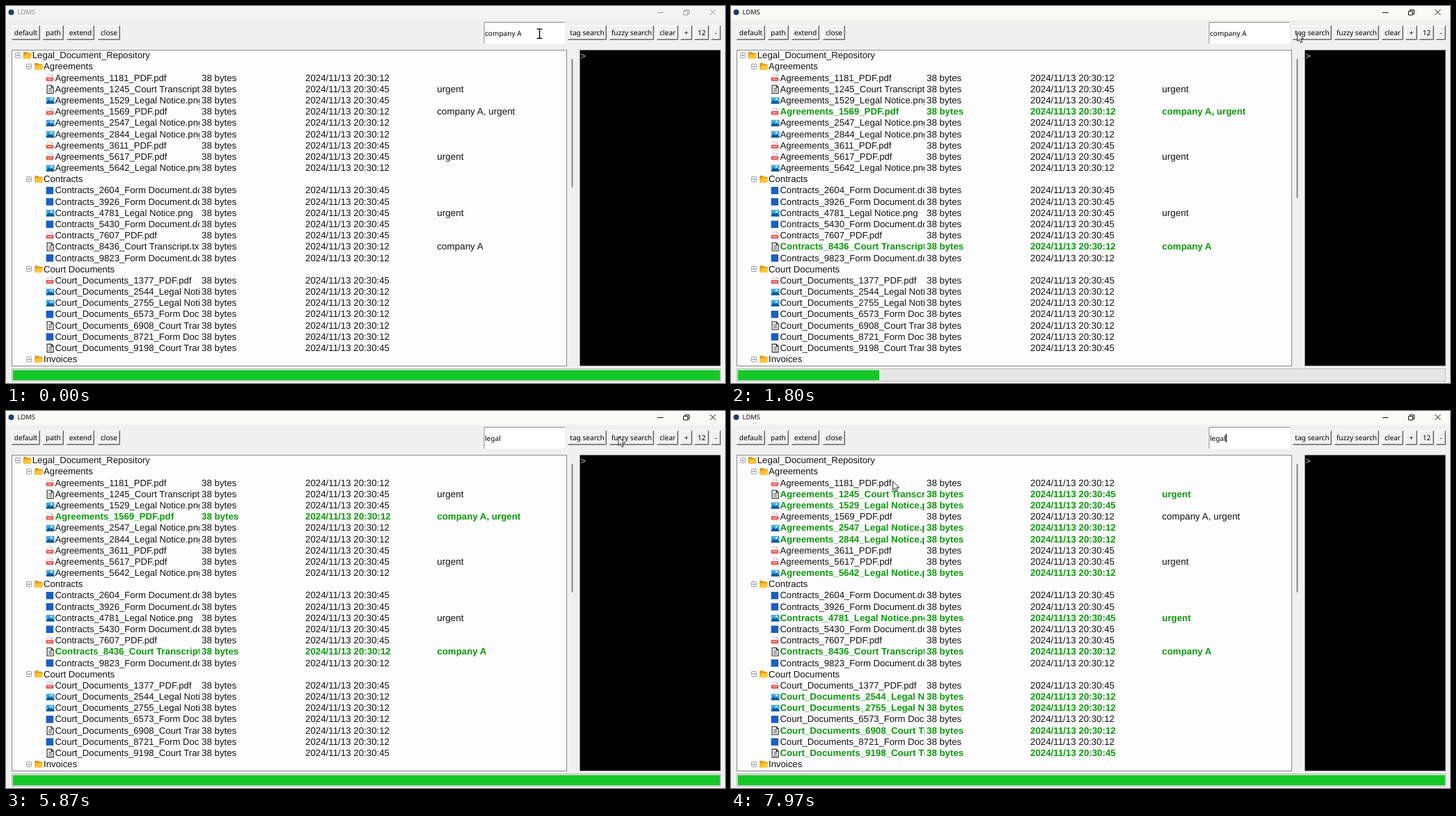
Recreate the animation shown at these times as an HTML page. Size 1033x542 px, loop 8 s.

```html
<!DOCTYPE html>
<html lang="en">
<head>
<meta charset="utf-8">
<title>LDMS</title>
<style>
html, body { margin: 0; width: 100%; height: 100%; overflow: hidden; background: #f0f0f0; }
svg { display: block; width: 1033px; height: 542px; text-rendering: geometricPrecision; }
text { white-space: pre; }
.ui { font: 10.1px "Noto Sans", "Open Sans", sans-serif; }
.tree text { font: 13.3px "Liberation Sans", Arial, sans-serif; fill: #111; }
.tree .name { font-size: 13.12px; }
.tree .tags { font-size: 13.45px; }
.tree .hit text { font-weight: bold; font-size: 13.3px; fill: #0c9a0c; }
</style>
</head>
<body>
<svg id="stage" viewBox="0 0 1033 542"></svg>
<script>
const LOOP = 8000, TOTAL = 65, PITCH = 16.18, TOP = 70.9;
const stage = document.getElementById('stage');

function add(parent, tag, attrs = {}, text) {
  const el = document.createElementNS('http://www.w3.org/2000/svg', tag);
  for (const k in attrs) el.setAttribute(k, attrs[k]);
  if (text !== undefined) el.textContent = text;
  parent.appendChild(el);
  return el;
}
const rect = (p, x, y, width, height, fill, more) => add(p, 'rect', { x, y, width, height, fill, ...more });
const path = (p, d, stroke, fill = 'none', w = 1) => add(p, 'path', { d, stroke, fill, 'stroke-width': w });
const show = (el, on) => el.setAttribute('visibility', on ? 'visible' : 'hidden');

// Window frame
rect(stage, 0, 0, 1033, 542, '#f0f0f0');
const titleBar = rect(stage, 0, 0, 1033, 20, '#f9f9f5');
add(stage, 'circle', { cx: 7.5, cy: 9, r: 4, fill: '#1d3f66' });
const title = add(stage, 'text', { x: 16.5, y: 12.3, class: 'ui', style: 'font-size:9.4px' }, 'LDMS');
const controls = path(stage,
  'M936 9.5H944.5M973.5 7.5H979.5V13H973.5ZM975.5 7V5.5H981.5V11.5H980M1011.5 5L1019.5 13M1019.5 5L1011.5 13');

// Toolbar
function button(x1, x2, label) {
  rect(stage, x1, 28, x2 - x1, 21, '#f0f0f0');
  path(stage, `M${x1 + .5} 48V28.5H${x2 - 1}`, '#fff');
  path(stage, `M${x1 + 1} 47.5H${x2 - 1.5}V29`, '#a6a6a6');
  path(stage, `M${x1} 48.5H${x2 - .5}V28`, '#6c6c6c');
  add(stage, 'text', { x: (x1 + x2) / 2, y: 41.6, class: 'ui', 'text-anchor': 'middle' }, label);
}
[[8, 49, 'default'], [53, 83, 'path'], [87, 127, 'extend'], [132, 164, 'close'],
 [807, 863, 'tag search'], [867, 931, 'fuzzy search'], [935, 966, 'clear'],
 [969, 986, '+'], [989, 1010, '12'], [1013, 1027, '-']].forEach(b => button(...b));

// Search entry
rect(stage, 687, 23, 116, 31, '#fff');
path(stage, 'M687 54V23.5H803', '#8c8c8c');
const selBox = rect(stage, 688, 32, 0, 13, '#0078d7');
const entry = add(stage, 'text', { x: 688, y: 42.8, class: 'ui' });
const plain = add(entry, 'tspan'), picked = add(entry, 'tspan', { fill: '#fff' });
const caret = rect(stage, 0, 33, 1.3, 12, '#000');

// Panels
rect(stage, 8.5, 63.5, 797, 454, '#fdfdfd', { stroke: '#858a92' });
rect(stage, 824.3, 63.2, 202.4, 454.1, '#000', { stroke: '#a0a0a0', 'stroke-width': .6 });
add(stage, 'text', { x: 825.5, y: 75.6, fill: '#c8c8c8', style: 'font:12.5px "Liberation Sans",sans-serif' }, '>');
const thumb = rect(stage, 812.5, 76, 2, 185, '#858585', { rx: 1 });
const arrows = path(stage, 'M810 73L813.7 67L817.4 73ZM810 509L813.7 515L817.4 509Z', 'none', '#a3a3a3');
rect(stage, 8.5, 521.5, 1018, 18, '#e6e6e6', { stroke: '#bcbcbc' });
const bar = rect(stage, 9.8, 523.5, 1016, 14.6, '#14c828');

// Tree
const kinds = {
  p: 'PDF.pdf', t: 'Court Transcript.txt', i: 'Legal Notice.png', w: 'Form Document.docx'
};
const icons = {
  folder(g, x, y) {
    path(g, `M${x} ${y - 5}h4.5l1.5 1.5h5v8h-11z`, 'none', '#dc9a16');
    path(g, `M${x} ${y + 5}l2-6.5h10l-1.6 6.5z`, 'none', '#ffc636');
  },
  p(g, x, y) {
    path(g, `M${x + 2} ${y - 5.5}h5.5l3 3v8.5h-8.5z`, '#d3d5d8', '#eceef0', .7);
    path(g, `M${x + 7.5} ${y - 5.5}v3h3z`, 'none', '#c2c5c9');
    rect(g, x, y - .6, 10.5, 5, '#e5504c', { rx: .8 });
    rect(g, x + 2, y + 1.2, 6.5, 1.3, '#f8cac8');
  },
  t(g, x, y) {
    path(g, `M${x + 1.5} ${y - 5.5}h6l3 3v8.5h-9zM${x + 7.5} ${y - 5.5}v3h3`, '#222', '#fff', 1.1);
    path(g, `M${x + 3.5} ${y - 1}h5M${x + 3.5} ${y + 1.2}h5M${x + 3.5} ${y + 3.4}h5`, '#333', 'none', .9);
  },
  i(g, x, y) {
    rect(g, x, y - 4.3, 12, 9.3, '#43a9e6', { rx: 1 });
    path(g, `M${x} ${y + 4}l3.8-4.5l2.4 2.4l2-1.8l3.8 3.9v1h-12z`, 'none', '#0f5790');
    add(g, 'circle', { cx: x + 7.8, cy: y - 1.8, r: 1.3, fill: '#fff' });
  },
  w(g, x, y) { rect(g, x, y - 5, 10.5, 10.5, '#1b5fc1'); }
};
const folders = [
  ['Agreements', '1181p12 1245t45u 1529i45 1569p12cu 2547i12 2844i12 3611p45 5617p45u 5642i12'],
  ['Contracts', '2604w45 3926w45 4781i45u 5430w45 7607p45 8436t12c 9823w12'],
  ['Court Documents', '1377p45 2544i12 2755i12 6573w12 6908t12 8721w12 9198t45'],
  ['Invoices', '']
];
const clip = add(add(stage, 'defs'), 'clipPath', { id: 'nameCol' });
rect(clip, 9, 64, 269, 453, '#000');
const tree = add(stage, 'g', { class: 'tree' });
const rows = [];

function addRow(level, icon, name, [size, date, tags] = [], tests = {}) {
  const g = add(tree, 'g'), y = TOP + rows.length * PITCH, x = 25 + 16.3 * level;
  const put = (tx, s, more) => add(g, 'text', { x: tx, y: y + 4.4, ...more }, s);
  icons[icon](g, x, y);
  put(x + 12.8, name, { class: 'name', 'clip-path': 'url(#nameCol)' });
  if (size) {
    put(281, size);
    put(430, date);
    put(619.3, tags, { class: 'tags' });
  }
  let toggle = null;
  if (icon === 'folder') {
    toggle = add(g, 'g');
    const tx = Math.round(x - 12), ty = Math.round(y - 3) - .5;
    rect(toggle, tx + .5, ty, 7, 7, '#fafafa', { stroke: '#999', rx: .8 });
    path(toggle, `M${tx + 2} ${ty + 3.5}h4`, '#44609c');
  }
  rows.push({ g, toggle, tests });
}
addRow(0, 'folder', 'Legal_Document_Repository');
for (const [name, files] of folders) {
  addRow(1, 'folder', name);
  for (const f of files.split(' ').filter(Boolean)) {
    const [, num, kind, sec, tags] = f.match(/(\d+)(\w)(\d\d)(\w*)/);
    const labels = [...tags].map(c => c === 'c' ? 'company A' : 'urgent').join(', ');
    addRow(2, kind, `${name.replace(' ', '_')}_${num}_${kinds[kind]}`,
      ['38 bytes', `2024/11/13 20:30:${sec}`, labels],
      { tag: tags.includes('c'), fuzzy: kind === 't' || kind === 'i' });
  }
}

// Pointers
const arrow = path(stage, 'M0 0V12.6L2.9 9.9L5 14.8L7.1 13.9L5 9.2H9Z', '#111', '#fff', .9);
const beam = path(stage, 'M-4 -6.5H-1L0 -5.7L1 -6.5H4M0 -5.7V6M-4 7H-1L0 6L1 7H4', '#000', 'none', 1.4);

// Timeline
const moves = [
  [0, 766.6, 39.6], [350, 766.6, 39.6], [800, 813.6, 38], [2500, 813.6, 38], [2950, 744, 39], [3050, 744, 39],
  [3580, 676.5, 38], [5000, 676.5, 38], [5650, 880, 37], [6750, 880, 37], [7900, 232.6, 101], [LOOP, 232.6, 101]
];
const runs = [
  { start: -LOOP, rate: 1, test: '' },
  { start: 963, rate: .0716, test: 'tag' },
  { start: 5900, rate: .0979, test: 'fuzzy' }
];
const FOCUS = 150, DRAG = 3050, TYPE = 3850, KEY = 150;

function pointerAt(t) {
  const i = moves.findIndex(m => m[0] > t);
  const [t0, x0, y0] = moves[i - 1], [t1, x1, y1] = moves[i];
  const u = (t - t0) / (t1 - t0), e = u * u * (3 - 2 * u);
  return [x0 + (x1 - x0) * e, y0 + (y1 - y0) * e];
}

function caretOn(t) {
  const blink = from => (t - from) % 900 < 600;
  if (t < FOCUS || (t >= DRAG && t < TYPE)) return false;
  if (t < DRAG) return blink(100);
  if (t < 4500) return true;
  if (t < 5700) return blink(4500);
  return t >= 6600 && blink(6600);
}

function drawEntry(t, px) {
  const typed = t >= TYPE;
  const str = typed ? 'legal'.slice(0, 1 + Math.floor((t - TYPE) / KEY)) : 'company A';
  plain.textContent = str;
  picked.textContent = '';
  const full = plain.getComputedTextLength();
  const dragging = t >= DRAG && !typed;
  if (dragging) {
    let n = 0;
    while (n < str.length &&
      688 + plain.getSubStringLength(0, n + 1) - plain.getSubStringLength(n, 1) / 2 < px) n++;
    const left = n ? plain.getSubStringLength(0, n) : 0;
    plain.textContent = str.slice(0, n);
    picked.textContent = str.slice(n);
    selBox.setAttribute('x', 688 + left);
    selBox.setAttribute('width', full - left);
  }
  show(selBox, dragging);
  caret.setAttribute('x', 688 + full);
  show(caret, caretOn(t));
}

function drawTree(t) {
  const run = runs.filter(r => r.start <= t).pop();
  const count = Math.min(TOTAL, Math.floor((t - run.start) * run.rate + .5));
  rows.forEach((r, i) => {
    r.g.setAttribute('display', i < count ? 'inline' : 'none');
    r.g.setAttribute('class', r.tests[run.test] ? 'hit' : '');
    if (r.toggle) show(r.toggle, i + 1 < count);
  });
  const scrolls = count > 28;
  show(thumb, scrolls);
  show(arrows, !scrolls);
  thumb.setAttribute('height', 429 * 28 / Math.max(28, count));
  bar.setAttribute('width', 1016 * (count >= TOTAL ? 1 : count > 19 ? .2 : 0));
}

function draw(t) {
  const active = t >= FOCUS;
  titleBar.setAttribute('fill', active ? '#f9f9f5' : '#f3f3f3');
  title.setAttribute('fill', active ? '#111' : '#8c8c8c');
  controls.setAttribute('stroke', active ? '#111' : '#999');

  const [px, py] = pointerAt(t);
  const inEntry = px > 687 && px < 803 && py < 54;
  show(arrow, !inEntry);
  show(beam, inEntry);
  (inEntry ? beam : arrow).setAttribute('transform', `translate(${px} ${py})`);
  drawEntry(t, px);
  drawTree(t);
}

function tick() {
  draw(performance.now() % LOOP);
  requestAnimationFrame(tick);
}
tick();
</script>
</body>
</html>
```
